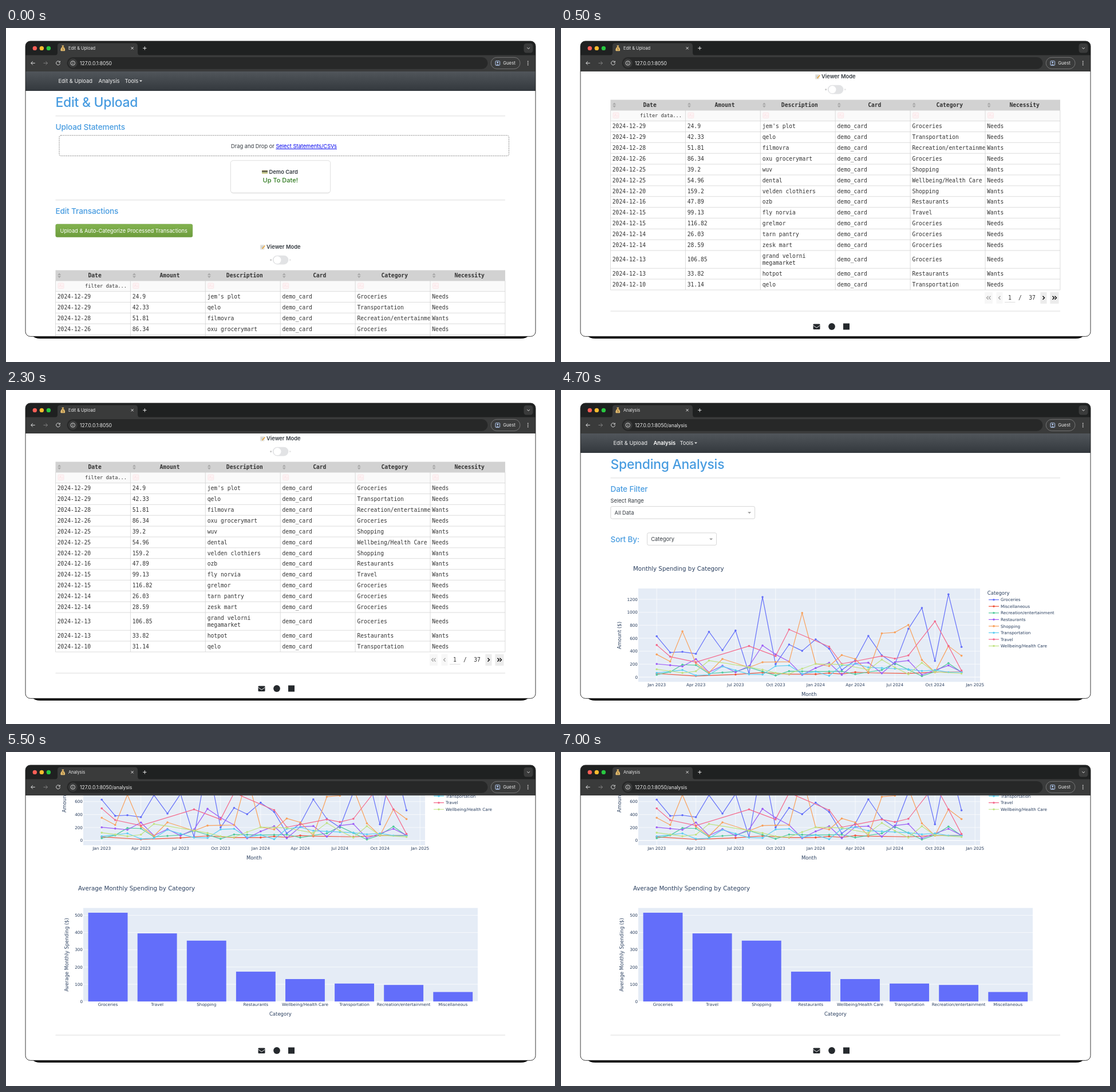
Animation of 959 by 584 pixels, one loop 8 s. Source, as an HTML page:

```html
<!DOCTYPE html>
<html lang="en">
<head>
<meta charset="utf-8">
<title>Budget dashboard</title>
<style>
html, body { margin: 0; width: 100%; height: 100%; overflow: hidden; background: #fff; }
svg { display: block; font: 9.35px Inter, sans-serif; fill: #343a40; }
.ui { font-size: 7.4px; fill: #e8e8e8; }
.url { font-size: 8.5px; fill: #eee; }
.nav { fill: #f2f2f2; }
.h1, .h4 { font-weight: 500; letter-spacing: -.01em; fill: #489ce0; }
.h1 { font-size: 22.9px; }
.h4 { font-size: 13.6px; }
.bold { font-weight: 600; }
.ok { font-size: 11px; font-weight: 500; fill: #2f7a1f; }
.cell, .head, .filter { font: 9.68px "DejaVu Sans Mono", monospace; fill: #333; }
.head { font-weight: 700; }
.filter { font-size: 8.67px; }
.tick, .axis, .title { font: 7.28px "DejaVu Sans", sans-serif; fill: #2a3f5f; }
.axis { font-size: 8.48px; }
.title { font-size: 10.28px; }
.mid { text-anchor: middle; }
.end { text-anchor: end; }
</style>
</head>
<body>
<svg id="stage" width="959" height="584" viewBox="0 0 959 584"></svg>
<script>
const text = (x, y, str, cls = '', extra = '') =>
  `<text x="${x}" y="${y}" class="${cls}" ${extra}>${str.replace(/&/g, '&amp;')}</text>`;
const rect = (x, y, w, h, fill, extra = '') =>
  `<rect x="${x}" y="${y}" width="${w}" height="${h}" fill="${fill}" ${extra}/>`;
const circle = (x, y, r, fill, extra = '') => `<circle cx="${x}" cy="${y}" r="${r}" fill="${fill}" ${extra}/>`;
const shape = (d, fill) => `<path d="${d}" fill="${fill}"/>`;
const stroke = (d, color, width = 1, extra = '') =>
  `<path d="${d}" fill="none" stroke="${color}" stroke-width="${width}" ${extra}/>`;
const hr = y => stroke(`M86.5 ${y}H872`, '#dcdcdc');
const range = n => [...Array(n).keys()];
const caret = (x, y, color, r = 3) => shape(`M${x - r} ${y - r / 2}h${2 * r}l${-r} ${r}z`, color);

function navbar(active) {
  const item = (x, name) => text(x, 96.4, name, name === active ? 'nav bold' : 'nav', name === active ? 'style="fill:#fff"' : '');
  return rect(34, 76, 891, 34, 'url(#bar)') + item(91.5, 'Edit & Upload') + item(161.5, 'Analysis') +
    item(207.5, 'Tools') + caret(235.5, 92.7, '#f2f2f2', 2.5);
}

function footer(y) {
  return hr(y) + rect(440.5, y + 22.5, 12, 9.5, '#25292d', 'rx="1.3"') +
    stroke(`M440.5 ${y + 25}l6 4.2l6 -4.2`, '#fff', .9) +
    circle(473, y + 27, 5.9, '#25292d') + rect(493, y + 21.5, 11, 11, '#25292d');
}

const columns = ['Date', 'Amount', 'Description', 'Card', 'Category', 'Necessity'];
const purchases = `12-29|24.9|jem's plot|Groceries|Needs
12-29|42.33|qelo|Transportation|Needs
12-28|51.81|filmovra|Recreation/entertainme|Wants
12-26|86.34|oxu grocerymart|Groceries|Needs
12-25|39.2|wuv|Shopping|Wants
12-25|54.96|dental|Wellbeing/Health Care|Needs
12-20|159.2|velden clothiers|Shopping|Wants
12-16|47.89|ozb|Restaurants|Wants
12-15|99.13|fly norvia|Travel|Wants
12-15|116.82|grelmor|Groceries|Needs
12-14|26.03|tarn pantry|Groceries|Needs
12-14|28.59|zesk mart|Groceries|Needs
12-13|106.85|grand velorni/megamarket|Groceries|Needs
12-13|33.82|hotpot|Restaurants|Wants
12-10|31.14|qelo|Transportation|Needs`.split('\n').map(row => row.split('|'));

function table() {
  const colX = i => 86.5 + i * 130.9;
  let out = rect(86.5, 423.5, 785.5, 18.5, '#d2d2d2') + rect(86.5, 442, 785.5, 18.5, '#fafafa');
  columns.forEach((name, i) => {
    const x = colX(i);
    out += text(x + 68.6, 436, name, 'head mid') +
      shape(`M${x + 3.6} 432h6l-3 -3.6zM${x + 3.6} 433.6h6l-3 3.6z`, '#a9a9a9') +
      rect(x + 4.5, 446, 10, 9.5, '#fdf3f4', 'rx="1.5" stroke="#fbe0e3" stroke-width=".7"') +
      stroke(`M${x + 6.5} 453l2 -4.5l2 4.5M${x + 12.5} 450.5v2.5`, '#fbdde1', .7);
  });
  out += text(211, 454.2, 'filter data...', 'filter end');
  let y = 460.6, lines = 'M86.5 442H872M86.5 460.6H872';
  for (const [date, amount, shop, category, need] of purchases) {
    const parts = shop.split('/'), height = parts.length > 1 ? 31.2 : 18.87, base = y + height / 2 + 3.3;
    ['2024-' + date, amount, null, 'demo_card', category, need].forEach((value, i) => {
      if (value) out += text(colX(i) + 3.3, base, value, 'cell');
    });
    parts.forEach((part, k) => out += text(351.7, base + (k - (parts.length - 1) / 2) * 12.3, part, 'cell'));
    y += height;
    lines += `M86.5 ${y}H872`;
  }
  range(7).forEach(i => lines += `M${colX(i)} 442V${y}`);
  return out + stroke(lines, '#d3d3d3', .8);
}

function pager() {
  const chevron = (x, dir) => `M${x - dir * 1.5} 766.8l${dir * 3} 3l${-dir * 3} 3`;
  const button = (x, w, bg, ink, d) => rect(x - w / 2, 760, w, 20, bg) + stroke(d, ink, 1.5);
  return button(747, 14, '#f7f7f7', '#aaa', chevron(745, -1) + chevron(749, -1)) +
    button(766, 11, '#f7f7f7', '#aaa', chevron(766, -1)) +
    button(843, 11, '#ececec', '#111', chevron(843, 1)) +
    button(862, 15, '#ececec', '#111', chevron(860, 1) + chevron(864, 1)) +
    text(784, 773.3, '1', 'cell mid') + text(802, 773.3, '/', 'cell mid') + text(823, 773.3, '37', 'cell mid') +
    stroke('M775 777.5H793.5', '#ddd');
}

function editPage() {
  const cardIcon = rect(447, 248.5, 10, 6.5, '#e9d9a0', 'rx="1"') + rect(447, 249.5, 10, 2, '#3c3f36') + rect(447, 252.5, 10, 1, '#7aa06a');
  const memoIcon = rect(444, 379, 7.5, 8.5, '#e4e4e0', 'rx="1"') + stroke('M445.5 382h4M445.5 384h4', '#a5adb3', .6) +
    stroke('M452.3 380.5L447.5 386', '#e8a33b', 1.6);
  return navbar('') + text(86.5, 138, 'Edit & Upload', 'h1') + hr(153.8) +
    text(86.5, 178, 'Upload Statements', 'h4') +
    rect(93, 187.8, 785.5, 35.8, 'none', 'rx="3" stroke="#555" stroke-width=".7" stroke-dasharray="1.9 1.3"') +
    text(393, 210, 'Drag and Drop or <tspan fill="#00e" text-decoration="underline">Select Statements/CSVs</tspan>', '', 'style="font-size:9.3px"') +
    rect(392.5, 233, 174, 56.5, '#eee', 'rx="4.5"') +
    rect(392.3, 231.7, 174.4, 56.5, '#fff', 'rx="4.5" stroke="#d6d6d6" stroke-width=".8"') +
    cardIcon + text(459.5, 255, 'Demo Card', 'bold') + text(479.3, 270.3, 'Up To Date!', 'ok mid') +
    hr(300.8) + text(86.5, 325, 'Edit Transactions', 'h4') +
    rect(86.8, 343, 239, 22.6, 'url(#green)', 'rx="2.5" stroke="#6b9a3c" stroke-width=".6"') +
    text(94.5, 357.8, 'Upload & Auto-Categorize Processed Transactions', '', 'style="fill:#fff;font-size:9.25px"') +
    memoIcon + text(455, 386.4, 'Viewer Mode', 'bold') +
    circle(462.7, 405.6, 1.6, '#ccc') + circle(496.3, 405.6, 1.4, '#e4e4e4') +
    rect(465.8, 397.8, 27.6, 15.6, '#e2e3e5', 'rx="7.8"') + circle(474, 405.6, 6.5, '#fff') +
    table() + pager() + footer(793);
}

// Monthly totals from January 2023: "-" is an empty month, "~" lies on the line between its neighbours.
const series = [
  ['Groceries', '#636efa', '630 380 390 360 700 415 718 55 1235 200 503 405 583 440 110 260 635 335 200 745 1068 250 1278 465'],
  ['Miscellaneous', '#ef553b', '55 - - 17 - - 40 - 70 - 45 - 45 63 48 76 66 - - 57 - 76 - 78'],
  ['Recreation/entertainment', '#4fc99a', '35 80 192 185 55 ~ 85 150 ~ 25 92 ~ 85 ~ 90 45 ~ 110 215 ~ 15 85 215 75'],
  ['Restaurants', '#9c5cf5', '203 ~ 165 278 75 175 75 170 488 350 240 35 140 220 35 210 222 60 230 255 35 ~ 180 80'],
  ['Shopping', '#f9a15c', '350 240 705 215 70 280 - 150 230 ~ 238 990 205 170 340 280 75 675 690 805 265 75 480 330'],
  ['Transportation', '#5bcdf0', '65 ~ 110 25 35 165 ~ 45 40 170 180 50 85 20 180 205 150 ~ ~ 120 95 110 75 75'],
  ['Travel', '#f4688b', '495 315 - 230 - - - 480 - 325 735 - - 470 205 ~ - 325 285 335 - 860 480 100'],
  ['Wellbeing/Health Care', '#c0e383', '120 ~ 65 90 255 - - 155 115 65 50 130 205 ~ 195 - 115 270 150 45 220 80 - 55']
];
const averages = { Groceries: 515, Travel: 395, Shopping: 353, Restaurants: 173, 'Wellbeing/Health Care': 130,
  Transportation: 104, 'Recreation/entertainment': 96, Miscellaneous: 55 };

const monthX = m => 167.2 + (Date.UTC(2023, m) - Date.UTC(2023, 0)) / 864e5 * .7606;
const moneyY = v => 502 - v * .1133;

function readSeries(data) {
  const marks = data.split(' ');
  const known = step => i => { while (!(marks[i] >= 0)) i += step; return i; };
  const before = known(-1), after = known(1);
  return marks.flatMap((mark, i) => {
    if (mark === '-') return [];
    const a = before(i), b = after(i), t = a === b ? 0 : (i - a) / (b - a);
    return [[monthX(i), moneyY(+marks[a] + (marks[b] - marks[a]) * t)]];
  });
}

function lineChart() {
  let out = text(126, 316.3, 'Monthly Spending by Category', 'title') + rect(135, 347, 597, 163.3, '#e5ecf6');
  range(7).forEach(i => {
    const y = moneyY(i * 200);
    out += stroke(`M135 ${y}H732`, '#fff', i ? .7 : 1.2) + text(134, y + 2.7, `${i * 200}`, 'tick end');
  });
  range(9).forEach(i => {
    const x = monthX(i * 3), label = ['Jan', 'Apr', 'Jul', 'Oct'][i % 4] + ' ' + (2023 + (i >> 2));
    out += stroke(`M${x} 347V510.3`, '#fff', .7) + text(x, 518.3, label, 'tick mid');
  });
  series.forEach(([name, color, data], i) => {
    const points = readSeries(data), y = 366.7 + i * 11.55;
    out += stroke('M' + points.join('L'), color, 1.2, 'stroke-linejoin="round"') +
      points.map(([px, py]) => circle(px, py, 1.8, color)).join('') +
      stroke(`M747 ${y}h18`, color, 1.2) + circle(756, y, 1.8, color) + text(768, y + 2.6, name, 'tick');
  });
  return out + text(744.8, 357.6, 'Category', 'axis') + text(433.3, 535, 'Month', 'axis mid') +
    text(0, 0, 'Amount ($)', 'axis mid', 'transform="translate(104.5 429)rotate(-90)"');
}

function barChart() {
  const bottom = 783.5, step = 86.1, scale = .3013;
  let out = text(126, 589.3, 'Average Monthly Spending by Category', 'title') + rect(135, 620, 689, 163.5, '#e5ecf6');
  range(6).forEach(i => {
    const y = bottom - i * 100 * scale;
    out += stroke(`M135 ${y}H824`, '#fff', i ? .7 : 1.2) + text(134, y + 2.7, `${i * 100}`, 'tick end');
  });
  Object.entries(averages).forEach(([name, value], i) => {
    const x = 135 + step * (i + .5), h = value * scale;
    out += rect(x - step * .4, bottom - h, step * .8, h, '#636efa') + text(x, 791.5, name, 'tick mid');
  });
  return out + text(479.3, 808, 'Category', 'axis mid') +
    text(0, 0, 'Average Monthly Spending ($)', 'axis mid', 'transform="translate(109 701.8)rotate(-90)"');
}

function analysisPage() {
  const select = (x, y, w, value) => rect(x, y, w, 21.5, '#fff', 'rx="2.5" stroke="#ccc" stroke-width=".8"') +
    text(x + 6.7, y + 14.3, value) + caret(x + w - 9.5, y + 11.2, '#999');
  return navbar('Analysis') + text(86.5, 138, 'Spending Analysis', 'h1') + hr(153.8) +
    text(86.5, 178, 'Date Filter', 'h4') + text(86.5, 197.4, 'Select Range') + select(86.8, 203.6, 251.8, 'All Data') +
    text(86.5, 265.6, 'Sort By:', 'h4') + select(150.6, 249.8, 121, 'Category') +
    lineChart() + barChart() + footer(842.3);
}

function browser() {
  const arrow = (x, dir, color) => stroke(`M${x - dir * 3.5} 61.4h7M${x - dir * 3.5} 61.4`.replace('h7', `h${dir * 7}`) +
    `M${x + dir * .4} 58.3l${dir * 3.1} 3.1l${-dir * 3.1} 3.1`, color, 1);
  const bag = shape('M97.3 30.5h4l-1 2.4c3 1.6 4 7.4 1.5 7.4h-5c-2.500 0 -1.500 -5.800 1.500 -7.400z', '#e2bd72') +
    stroke('M97.600 33h3.400', '#a8772c', .9) + stroke('M100.500 35.600h-2v1.500h2v1.500h-2', '#8a6424', .7);
  return rect(34, 23, 891, 25, '#1f2121') + rect(34, 47.5, 891, 28.5, '#3a3b3b') +
    shape('M85 48q5 0 5 -5v-11.500q0 -5 5 -5h130q5 0 5 5v11.500q0 5 5 5z', '#3a3b3b') +
    ['#fe5f57', '#febc2e', '#28c840'].map((c, i) => circle(50.3 + i * 12.05, 35.4, 3.7, c)).join('') + bag +
    text(109, 37.8, '', 'ui', 'id="tab"') +
    stroke('M218.600 33.300l4 4m0 -4l-4 4M239.200 35.300h6.200M242.300 32.200v6.200', '#e8e8e8', 1) +
    rect(904.5, 27, 16, 16.5, '#3a3b3b', 'rx="4.5"') + stroke('M910.400 34.300l2.200 2.200l2.200 -2.200', '#e8e8e8', 1) +
    arrow(47.2, -1, '#dcdcdc') + arrow(69, 1, '#808080') +
    stroke('M93.800 59.300a3.400 3.400 0 1 0 .600 2.400M94.300 57.600v2.400h-2.400', '#dcdcdc', 1) +
    rect(106.5, 51, 735, 20.8, '#272828', 'rx="10.4"') + circle(116.8, 61.4, 7.8, '#3a3b3b') +
    circle(116.8, 61.4, 3.7, 'none', 'stroke="#e0e0e0" stroke-width=".9"') +
    stroke('M116.800 60.800v2.600M116.800 59.100v.900', '#e0e0e0', .9) +
    text(129, 64.5, '', 'url', 'id="url"') +
    rect(847.2, 51.4, 50.8, 20, 'none', 'rx="10" stroke="#858585" stroke-width=".8"') +
    rect(855, 57.7, 7.6, 7.6, 'none', 'rx="1" stroke="#b5cdf5" stroke-width="1"') +
    circle(858.8, 60.4, 1.4, '#b5cdf5') + shape('M856 64.800q2.800 -3 5.600 0z', '#b5cdf5') +
    text(868.2, 64.3, 'Guest', 'ui', 'style="font-size:7.8px"') +
    range(3).map(i => circle(911.7, 58.4 + i * 3, .9, '#dcdcdc')).join('');
}

const gradient = (id, from, to) =>
  `<linearGradient id="${id}" x2="0" y2="1"><stop stop-color="${from}"/><stop offset="1" stop-color="${to}"/></linearGradient>`;
const frame = 'x="34" y="23" width="891" height="516.3" rx="8.500"';
const byId = id => document.getElementById(id);

byId('stage').innerHTML = `<defs>${gradient('bar', '#51565b', '#33383d')}${gradient('green', '#83b350', '#6c9c3c')}
  <clipPath id="window"><rect ${frame}/></clipPath></defs>
  ${shape('M46 538H913Q909 543 899 543H60Q50 543 46 538z', '#000')}
  <g clip-path="url(#window)">${rect(34, 23, 891, 517, '#fff')}
  <g id="edit">${editPage()}</g><g id="analysis">${analysisPage()}</g>${browser()}</g>
  <rect ${frame} fill="none" stroke="#222" stroke-width=".9"/>`;

const scenes = [
  { start: 0, page: 'edit', scroll: 0 },
  { start: 500, page: 'edit', scroll: 298 },
  { start: 3500, page: 'analysis', scroll: 0 },
  { start: 5500, page: 'analysis', scroll: 347.3 }
];
const tabs = { edit: ['Edit & Upload', '127.0.0.1:8050'], analysis: ['Analysis', '127.0.0.1:8050/analysis'] };
let shown;

function draw(now) {
  const scene = scenes.findLast(s => s.start <= now % 8000);
  if (scene !== shown) {
    shown = scene;
    for (const page in tabs) byId(page).style.display = page === scene.page ? '' : 'none';
    byId(scene.page).setAttribute('transform', `translate(0 ${-scene.scroll})`);
    [byId('tab').textContent, byId('url').textContent] = tabs[scene.page];
  }
  requestAnimationFrame(draw);
}
draw(performance.now());
</script>
</body>
</html>
```
